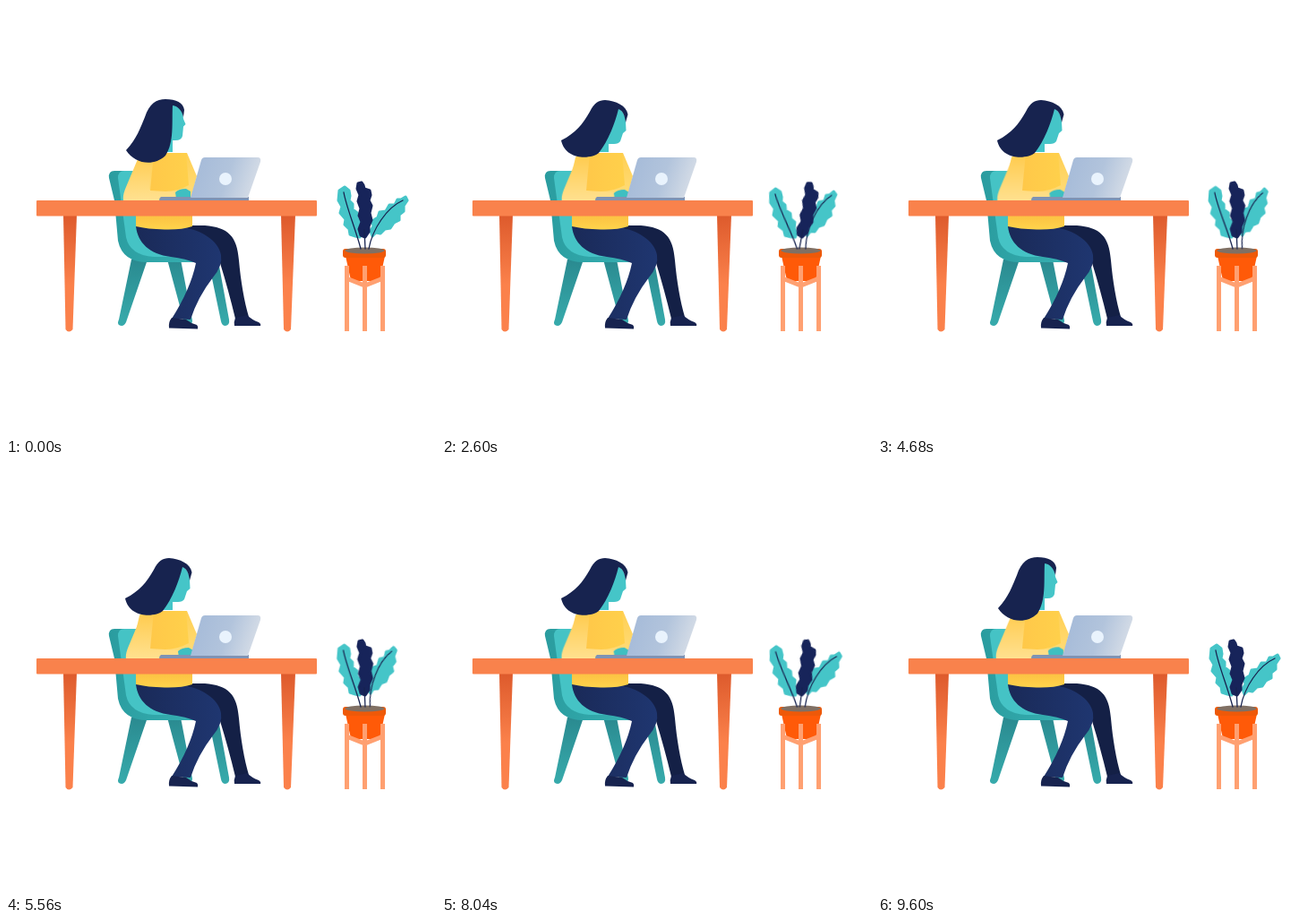
An HTML page without scripts for the animation above (9.64 s loop, 480x480 px).

```html
<!DOCTYPE html>
<html lang="en">
<head>
<meta charset="utf-8">
<title>At the desk</title>
<style>
  html, body { margin: 0; width: 100%; height: 100%; overflow: hidden; background: #fff; }
  svg { display: block; width: 100%; height: 100%; }

  .hair, .face, .leaf { animation: 9640ms ease-in-out infinite; }
  .hair { animation-name: tilt-hair; fill: #17234f; }
  .face { animation-name: tilt-face; fill: #45c5c8; }
  .leaf { stroke-width: 3; stroke-linejoin: round; }
  .leaf path { fill: none; stroke: #17234f; stroke-width: 1.3; stroke-linecap: round; }
  .left { animation-name: sway-left; transform-origin: 397px 265px; }
  .middle { animation-name: sway-middle; transform-origin: 401px 262px; }
  .right { animation-name: sway-right; transform-origin: 404px 265px; }
  .teal { fill: #45c5c8; stroke: #45c5c8; }
  .navy { fill: #17245a; stroke: #17245a; }
  .arm { animation: type 209.565ms ease-in-out infinite; }

  @keyframes tilt-hair {
    0%, 100% { d: path("M186 111C185 130 188 152 178 167C164 180 144 176 134 161C146 148 150 136 155 124C160 109 168 104 178 104C190 104 198 108 199 116L198 124C196 116 192 112 186 111Z"); }
    10%, 89.6% { d: path("M197 115C193 131 186 150 175 164C167 171 138 173 133 150C149 142 157 132 165 118C170 108 175 105 182 105C194 106 206 111 207.5 121L205 130C204 122 202 117 197 115Z"); }
  }
  @keyframes tilt-face {
    0%, 100% { d: path("M185 110Q197 112 198 126L200.5 132L198 134.500L197 145Q196 150 189 150H184Q184 130 185 110Z"); }
    10%, 89.6% { d: path("M196 114Q204 117 205 129L205.5 139L202 142L199 151Q197 154 192 154H182Q191 135 196 114Z"); }
  }
  @keyframes sway-left {
    0%, 54%, 100% { transform: rotate(0deg); }
    36%, 75% { transform: rotate(-6deg); }
  }
  @keyframes sway-middle {
    0%, 54%, 100% { transform: rotate(0deg); }
    25%, 75% { transform: rotate(13.5deg); }
  }
  @keyframes sway-right {
    0%, 100% { transform: rotate(0deg); }
    47.5% { transform: rotate(-14.8deg); }
  }
  @keyframes type {
    0%, 100% { transform: translate(0, 0); }
    50% { transform: translate(3px, 1px); }
  }
</style>
</head>
<body>
<svg viewBox="0 0 480 480">
  <defs>
    <linearGradient id="wood" x2="0" y2="1">
      <stop stop-color="#dd5a2c"/>
      <stop offset=".6" stop-color="#fb814b"/>
    </linearGradient>
    <linearGradient id="chairLeg" x2="0" y2="1">
      <stop stop-color="#2a8a90"/>
      <stop offset="1" stop-color="#37abac"/>
    </linearGradient>
    <linearGradient id="seat">
      <stop stop-color="#2a9c9f"/>
      <stop offset="1" stop-color="#38b3b5"/>
    </linearGradient>
    <linearGradient id="thigh">
      <stop stop-color="#1a2a58"/>
      <stop offset="1" stop-color="#1f3670"/>
    </linearGradient>
    <linearGradient id="shirt" x2="0" y2="1">
      <stop stop-color="#ffcf52"/>
      <stop offset="1" stop-color="#ffdd7c"/>
    </linearGradient>
    <linearGradient id="hem" x2="0" y2="1">
      <stop stop-color="#fbbf42"/>
      <stop offset="1" stop-color="#ffd44b"/>
    </linearGradient>
    <linearGradient id="sleeve">
      <stop stop-color="#ffc849"/>
      <stop offset="1" stop-color="#ffd04b"/>
    </linearGradient>
    <linearGradient id="forearm" x2="0" y2="1">
      <stop stop-color="#ffcc50"/>
      <stop offset="1" stop-color="#ffe190"/>
    </linearGradient>
    <linearGradient id="metal" y2=".2">
      <stop stop-color="#a3b9d8"/>
      <stop offset=".6" stop-color="#b2c4dc"/>
      <stop offset="1" stop-color="#d3dbe6"/>
    </linearGradient>
  </defs>

  <g id="chair">
    <g fill="url(#chairLeg)">
      <path d="M140 283H158L134 353Q131 359 126 356Q124 354 126 350Z"/>
      <path d="M180 283H195L208 351Q208 357 203 356Q199 355 198 350Z"/>
      <path d="M226 285H237L249 350Q250 356 245 357Q241 357 240 352Z"/>
    </g>
    <path fill="url(#seat)" d="M115 192Q114 184 121 184H141L150 250L225 270V286H158Q130 286 125 262L121 217Z"/>
    <path fill="#45c3c5" d="M125 192Q125 184 132 184H146L150 245L190 268V280H165Q138 278 134 258Z"/>
  </g>

  <g id="legs">
    <path fill="#142046" d="M190 245H222C248 247 258 257 260 284C262 307 266 330 271 347L256 349Q248 316 239 287L205 265Z"/>
    <path fill="#17234f" d="M256 348L269 345Q274 350 282 353Q285 355 284 357H255Q254 353 256 348Z"/>
    <path fill="url(#thigh)" d="M145 246H190C218 248 238 263 240 278Q242 290 231 303Q214 325 206 350L185 349Q206 316 212 287Q201 282 184 280C160 277 147 264 145 246Z"/>
    <path fill="#17234f" d="M185 348L201 350Q206 354 213 356Q215 358 214 360.500L182 359.500Q181 353 185 348Z"/>
  </g>

  <g id="body">
    <path fill="url(#hem)" d="M145 232H208V246Q196 250 177 249.500Q158 249 145 246Z"/>
    <path fill="url(#shirt)" d="M149 169Q153 164 161 164H202L213 190L206 217H138Z"/>
    <path fill="#45c5c8" d="M176 145H186V163H174Z"/>
    <g class="arm">
      <path fill="url(#forearm)" d="M147 171Q154 165 163 168L160 205L191 207L188 217H131Q130 211 134 202Z"/>
      <path fill="#3fbfc1" d="M189 208Q193 204 201 204L206 207V215H190Z"/>
    </g>
    <path fill="url(#sleeve)" d="M165 164H201L204 200Q191 207 178 207L161 206Z"/>
  </g>

  <g id="head">
    <path class="face" d="M185 110Q197 112 198 126L200.500 132L198 134.500L197 145Q196 150 189 150H184Q184 130 185 110Z"/>
    <path class="hair" d="M186 111C185 130 188 152 178 167C164 180 144 176 134 161C146 148 150 136 155 124C160 109 168 104 178 104C190 104 198 108 199 116L198 124C196 116 192 112 186 111Z"/>
  </g>

  <g id="laptop">
    <path fill="#7f93b4" d="M173 213H271V217H171Q171 214 173 213Z"/>
    <path fill="url(#metal)" d="M222 169H281Q285 169 284 174L270 214H206L218 172Q219 169 222 169Z"/>
    <circle cx="245" cy="193" r="7" fill="#e9f3fd"/>
  </g>

  <g id="table">
    <g fill="url(#wood)">
      <path d="M64 233H79L74.500 361Q70 366 66.500 361Z"/>
      <path d="M307 233H323L318 361Q314 366 310 361Z"/>
    </g>
    <rect x="34" y="217" width="313" height="17.500" rx="1" fill="#f9824c"/>
  </g>

  <g id="plant">
    <path fill="#ff5a08" d="M379 279H423L418 302Q417 307 412 307H390Q385 307 384 302Z"/>
    <rect x="376" y="271" width="48" height="10" rx="3" fill="#ee5909"/>
    <ellipse cx="400.500" cy="273" rx="22" ry="3.500" fill="#807064"/>
    <g class="leaf left">
      <polygon class="teal" points="395,258 390,257 384,255 383,249 378,244 379,238 373,231 375,224 371,217 372,206 378,202 383,206 384,212 383,217 387,221 387,227 392,231 392,237 396,241 395,248 397,253"/>
      <path d="M377 208C380 225 390 248 396 271"/>
    </g>
    <g class="leaf right">
      <polygon class="teal" points="446,213 448,217 444,223 444,229 439,233 439,239 433,242 429,248 423,249 418,254 413,253 409,257 407,251 410,246 409,240 415,236 417,230 424,229 428,222 434,222 437,216 441,216"/>
      <path d="M443 217C425 225 409 249 405 271"/>
    </g>
    <g class="leaf middle">
      <polygon class="navy" points="393,198 397,197 399,200 400,204 406,206 407,211 405,217 408,223 406,231 408,239 405,246 405,252 401,258 396,256 394,249 397,241 394,234 396,226 393,218 395,211 392,204"/>
      <path d="M400 250L401 271"/>
    </g>
    <path fill="none" stroke="#ffa071" stroke-width="5" d="M380.500 290V363M400.500 290V363M420.500 290V363M380 304L400.500 312L421 304"/>
  </g>
</svg>
</body>
</html>
```
